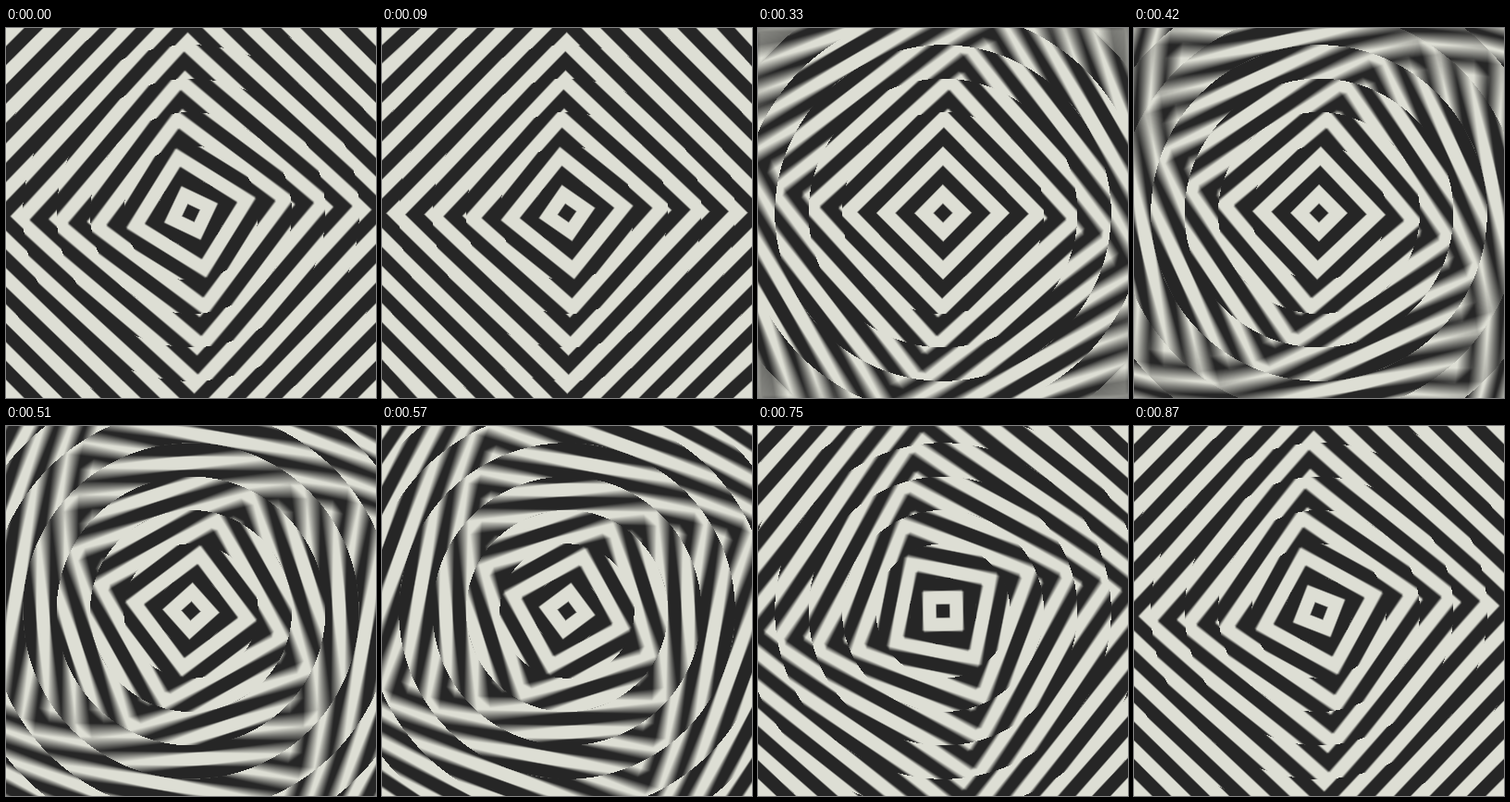
Animation, 400 px wide and 400 px high, one loop 900 ms. Source, as an HTML page with a canvas:

```html
<!DOCTYPE html>
<html lang="en">
<head>
<meta charset="utf-8">
<title>Twisting squares</title>
<style>
  html, body { margin: 0; width: 100%; height: 100%; overflow: hidden; background: #262626; }
  canvas { display: block; width: 100vw; height: 100vh; }
</style>
</head>
<body>
<canvas width="400" height="400"></canvas>
<script>
const SIZE = 400, LOOP = 900, STEP = 30;
const RING = 36.35, BAND = RING / 2.5, RINGS = 8;
const DELAY = 58, MIDDLE = 752, RISE = 370, SETTLE = 612;
const SHUTTER = 31, SAMPLES = 20;
const DARK = [38, 38, 38], LIGHT = [221, 222, 212];

const ctx = document.querySelector('canvas').getContext('2d');
const image = ctx.createImageData(SIZE, SIZE);
const ringOf = new Uint8Array(SIZE * SIZE);
for (let i = 0; i < ringOf.length; i++) {
  const x = i % SIZE + 0.5 - SIZE / 2, y = Math.floor(i / SIZE) + 0.5 - SIZE / 2;
  ringOf[i] = Math.min(RINGS - 1, Math.hypot(x, y) / RING);
}

// Quarter-turn progress of a ring; outer rings lead, and each turn settles slowly.
function turn(time, ring) {
  const phase = time + ring * DELAY - MIDDLE + RISE;
  const x = phase - LOOP * Math.floor(phase / LOOP) - RISE;
  return x < 0 ? 0.5 * (1 + x / RISE) ** 2.5 : 1 - 0.5 * (1 - x / SETTLE) ** 3;
}

function draw(time) {
  const cos = new Float64Array(RINGS * SAMPLES), sin = new Float64Array(RINGS * SAMPLES);
  for (let i = 0; i < cos.length; i++) {
    const offset = ((i % SAMPLES + 0.5) / SAMPLES - 0.5) * SHUTTER;
    const angle = (turn(time + offset, Math.floor(i / SAMPLES)) + 0.5) * Math.PI / 2;
    cos[i] = Math.cos(angle);
    sin[i] = Math.sin(angle);
  }
  const { data } = image;
  for (let i = 0; i < ringOf.length; i++) {
    const x = i % SIZE + 0.5 - SIZE / 2, y = Math.floor(i / SIZE) + 0.5 - SIZE / 2;
    const first = ringOf[i] * SAMPLES;
    let sum = 0;
    for (let j = first; j < first + SAMPLES; j++) {
      const u = Math.max(Math.abs(x * cos[j] + y * sin[j]), Math.abs(y * cos[j] - x * sin[j]));
      const edge = BAND / 2 - Math.abs(u % (2 * BAND) - BAND);
      sum += Math.min(1, Math.max(0, edge / 1.5 + 0.5));
    }
    const mix = sum / SAMPLES;
    for (let c = 0; c < 3; c++) data[i * 4 + c] = DARK[c] + (LIGHT[c] - DARK[c]) * mix;
    data[i * 4 + 3] = 255;
  }
  ctx.putImageData(image, 0, 0);
}

const start = performance.now();
let shown = -1;
function tick() {
  const elapsed = Math.max(0, performance.now() - start) % LOOP;
  const time = Math.floor(elapsed / STEP) * STEP;
  if (time !== shown) draw(shown = time);
  requestAnimationFrame(tick);
}
tick();
</script>
</body>
</html>
```
